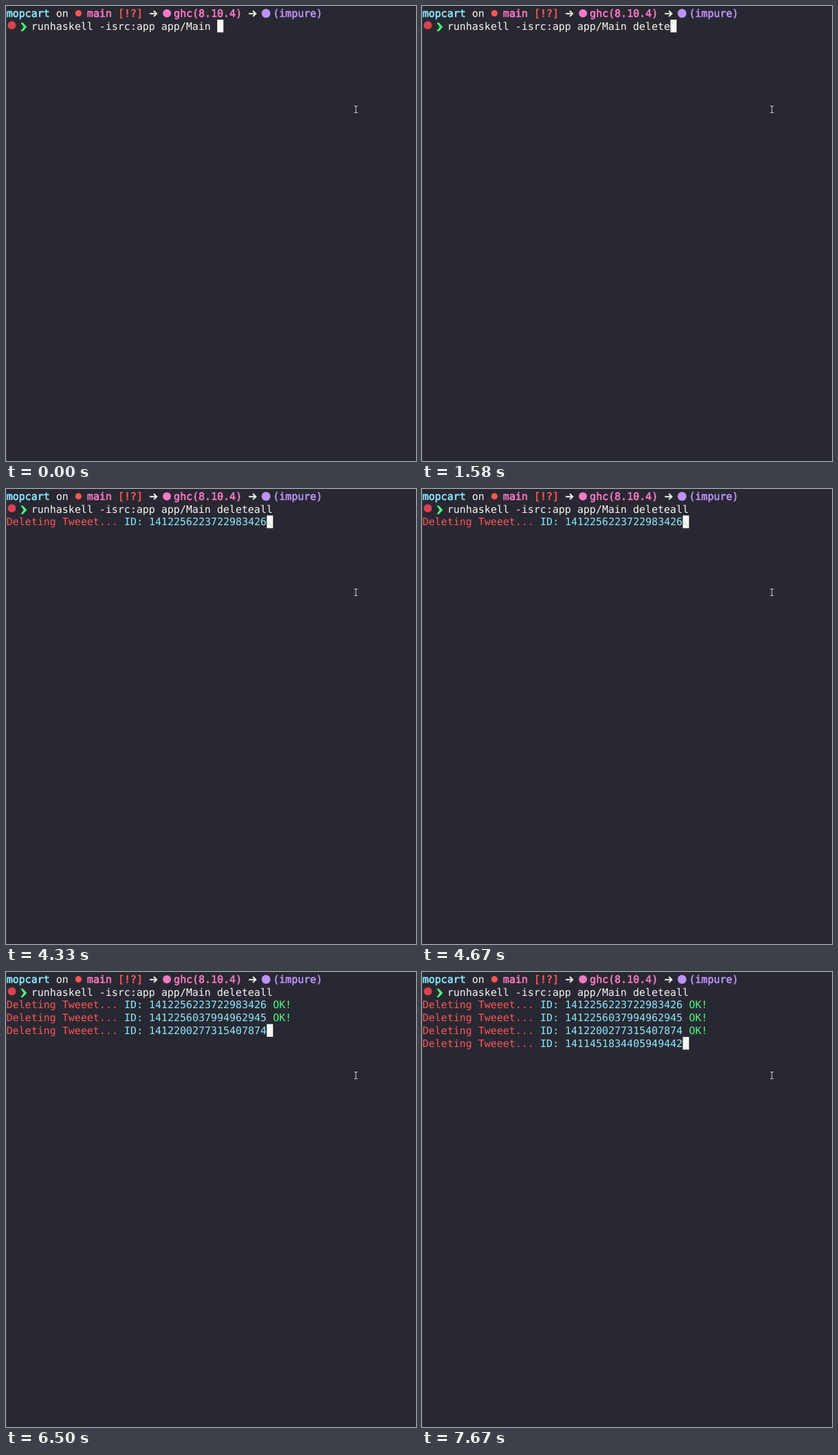
An HTML page for the animation above (8000 ms loop, 600 by 667 pixels).

```html
<!DOCTYPE html>
<html lang="en">
<head>
<meta charset="utf-8">
<title>Terminal session</title>
<style>
  html, body { margin: 0; width: 100%; height: 100%; overflow: hidden; background: #282832; }
  svg { display: block; width: 100vw; height: 100vh; }
  text { font: 15.066px "DejaVu Sans Mono", "Noto Sans Mono", monospace; white-space: pre; text-rendering: geometricPrecision; }
  .bold { stroke-width: 0.6; }
</style>
</head>
<body>
<svg id="stage" viewBox="0 0 600 667" xmlns="http://www.w3.org/2000/svg"></svg>
<script>
const LOOP = 8000;
const CELL = 9.07, ROW = 18.8;
const C = {
  white: '#f8f8f2', cyan: '#8be9fd', pink: '#ff79c6', purple: '#bd93f9',
  red: '#ff5555', green: '#50fa7b', edge: '#2b4158'
};
const stage = document.getElementById('stage');

const colX = col => 0.7 + col * CELL;
const rowY = row => 1.2 + row * ROW;

function add(tag, attrs, parent = stage) {
  const node = document.createElementNS('http://www.w3.org/2000/svg', tag);
  for (const key in attrs) node.setAttribute(key, attrs[key]);
  return parent.appendChild(node);
}

function write(row, col, string, fill, bold, parent) {
  const node = add('text', { x: colX(col), y: rowY(row) + 14.5, fill }, parent);
  if (bold) {
    node.setAttribute('class', 'bold');
    node.setAttribute('stroke', fill);
  }
  node.textContent = string;
  return node;
}

function arrow(col) {
  const x = colX(col);
  add('path', {
    d: `M${x + 1} 11.2h10.2m-4.3 -4.2l4.3 4.2l-4.3 4.2`,
    fill: 'none', stroke: C.white, 'stroke-width': 1.9
  });
}

add('rect', { width: 600, height: 667, fill: '#282832' });
add('rect', { width: 1, height: 667, fill: C.edge });

// Prompt
write(0, 0, 'mopcart', C.cyan, true);
write(0, 8, 'on', C.white);
add('circle', { cx: 106, cy: 10.8, r: 4.7, fill: C.red });
write(0, 13, 'main', C.pink, true);
write(0, 18, '[!?]', C.red, true);
arrow(23);
add('circle', { cx: 235.5, cy: 10.8, r: 6, fill: C.pink });
write(0, 27, 'ghc(8.10.4)', C.pink, true);
arrow(39);
add('circle', { cx: 380.5, cy: 10.8, r: 6.5, fill: C.purple });
write(0, 43, '(impure)', C.purple, true);
add('circle', { cx: 8.5, cy: 28.3, r: 6, fill: '#d9434f' });
add('path', { d: 'M21.5 24.5h3.2l5.8 6.3l-5.8 6.3h-3.2l4.4 -6.3z', fill: C.green });

const BASE = 'runhaskell -isrc:app app/Main ';
const WORD = 'deleteall';
const KEY_TIMES = [330, 420, 670, 670, 920, 1580, 1830, 2000, 2080];
const ENTER = 2500;
const command = write(1, 4, BASE, C.white);

const jobs = [
  [4330, '1412256223722983426'],
  [5420, '1412256037994962945'],
  [6500, '1412200277315407874'],
  [7420, '1411451834405949442']
].map(([start, id], i) => {
  const row = i + 2, line = add('g', {});
  write(row, 0, 'Deleting Tweeet...', C.red, false, line);
  write(row, 19, 'ID: ' + id, C.cyan, false, line);
  return { start, line, ok: write(row, 43, 'OK!', C.green, false, line) };
});

const cursor = add('rect', { width: 9.1, height: 18.6, fill: C.white });

// Mouse pointer
const beam = 'M509.5 146.5h1.5l1 1l1 -1h1.5M512 147.5v8M509.5 156.5h1.5l1 -1l1 1h1.5';
add('path', { d: beam, fill: 'none', stroke: '#17171e', 'stroke-width': 2.6 });
add('path', { d: beam, fill: 'none', stroke: '#d8d8d8', 'stroke-width': 1.1 });

const show = (node, on) => node.setAttribute('visibility', on ? 'visible' : 'hidden');

function render(t) {
  const typed = KEY_TIMES.filter(k => t >= k).length;
  const started = jobs.filter(job => t >= job.start).length;
  command.textContent = BASE + WORD.slice(0, typed);
  jobs.forEach((job, i) => {
    show(job.line, i < started);
    show(job.ok, i < started - 1);
  });
  const row = t < ENTER ? 1 : Math.max(2, started + 1);
  const col = t < ENTER ? 34 + typed : started ? 42 : 0;
  cursor.setAttribute('x', colX(col));
  cursor.setAttribute('y', rowY(row));
}

function tick() {
  render(performance.now() % LOOP);
  requestAnimationFrame(tick);
}
tick();
</script>
</body>
</html>
```
